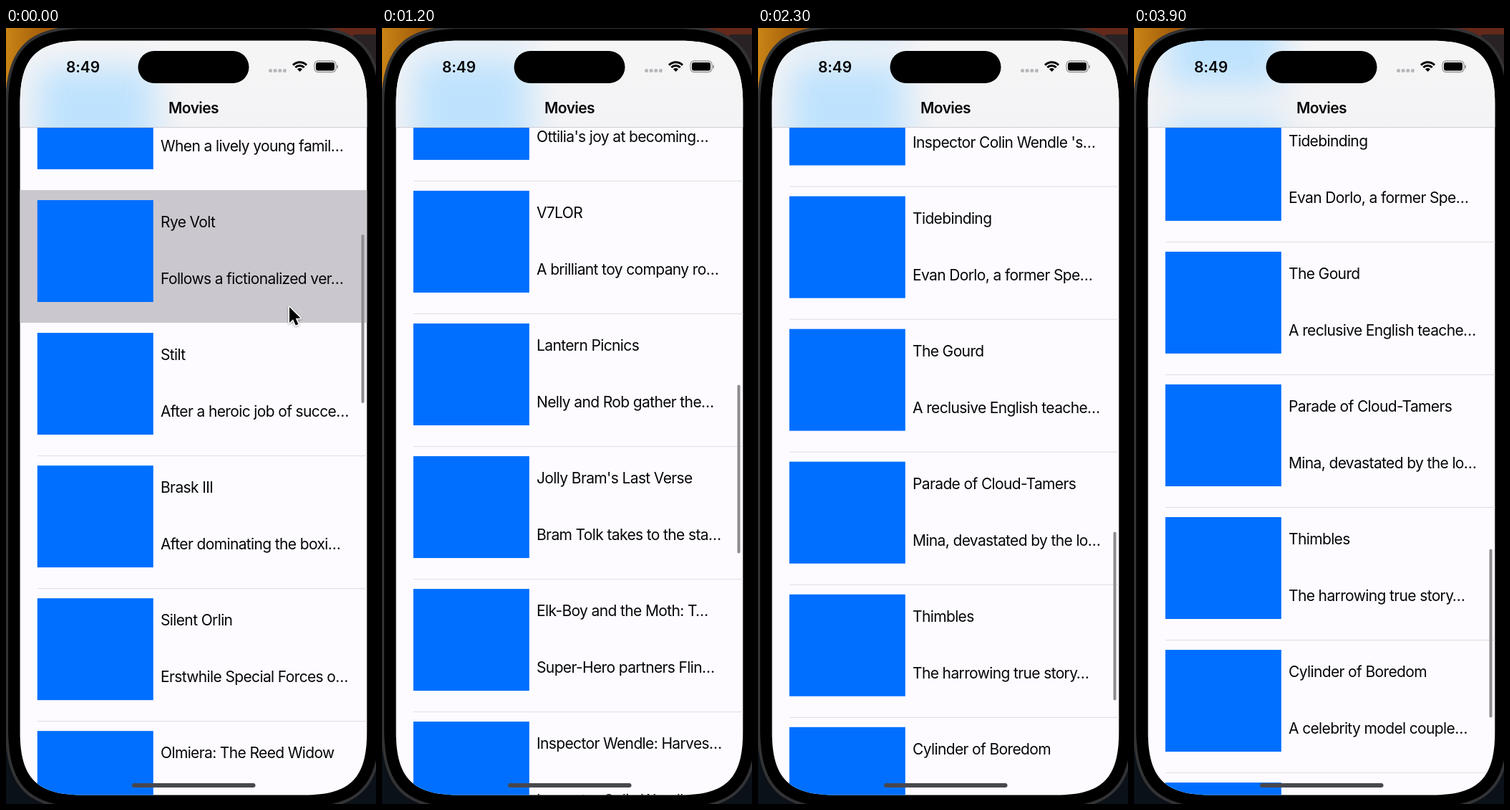
Write an HTML page with a canvas that moves like this. It is 517 by 1082 pixels and loops after 4000 ms.

```html
<!DOCTYPE html>
<html lang="en">
<head>
<meta charset="utf-8">
<title>Movies</title>
<style>
  html, body { margin: 0; width: 517px; height: 1082px; overflow: hidden; background: #000; }
  canvas { display: block; }
</style>
</head>
<body>
<canvas id="stage" width="517" height="1082"></canvas>
<script>
const ctx = document.getElementById('stage').getContext('2d');
const LOOP = 4000, STEP = 100;
const ROW = 185.05, FIRST_TOP = 240, THUMB_H = 142;
const HEADER_BOTTOM = 138;
const FONT = 'Inter, "Liberation Sans", sans-serif';

const movies = [
  ['', 'When a lively young famil…'],
  ['Rye Volt', 'Follows a fictionalized ver…'],
  ['Stilt', 'After a heroic job of succe…'],
  ['Brask III', 'After dominating the boxi…'],
  ['Silent Orlin', 'Erstwhile Special Forces o…'],
  ['Olmiera: The Reed Widow', "Ottilia's joy at becoming…"],
  ['V7LOR', 'A brilliant toy company ro…'],
  ['Lantern Picnics', 'Nelly and Rob gather the…'],
  ["Jolly Bram's Last Verse", 'Bram Tolk takes to the sta…'],
  ['Elk-Boy and the Moth: T…', 'Super-Hero partners Flin…'],
  ['Inspector Wendle: Harves…', "Inspector Colin Wendle 's…"],
  ['Tidebinding', 'Evan Dorlo, a former Spe…'],
  ['The Gourd', 'A reclusive English teache…'],
  ['Parade of Cloud-Tamers', 'Mina, devastated by the lo…'],
  ['Thimbles', 'The harrowing true story…'],
  ['Cylinder of Boredom', 'A celebrity model couple…'],
  ['', '']
];

const clamp01 = v => Math.min(1, Math.max(0, v));

// Two flicks, each gliding to rest with exponential friction; t in seconds.
function firstGlide(t) {
  return 519.4 * (1 - Math.exp(-2.03 * Math.max(0, t - 0.05)));
}
function secondGlide(t) {
  const friction = t < 1.9 ? 2.008 : 2.03;
  return 1968 - 252.5 * Math.exp(-friction * (t - 1.9));
}
function scrollAt(t) {
  const grab = 0.8, pull = 0.85, release = 1.05;
  if (t >= release) return secondGlide(t);
  const held = firstGlide(Math.min(t, grab));
  const u = clamp01((t - pull) / (release - pull));
  return held + (secondGlide(release) - held) * u ** 3.47;
}

function pointerAt(t) {
  if (t > 1.05) return null;
  const u = clamp01(t / 0.55), ease = u * u * (3 - 2 * u);
  const drag = t > 0.8 ? scrollAt(t) - scrollAt(0.8) : 0;
  return [396 - 90 * ease, 389 + 459 * ease - drag];
}

function fillRound(x, y, w, h, r, color) {
  ctx.beginPath();
  ctx.roundRect(x, y, w, h, r);
  ctx.fillStyle = color;
  ctx.fill();
}

function fillBox(x, y, w, h, color) {
  ctx.fillStyle = color;
  ctx.fillRect(x, y, w, h);
}

// Rectangle whose corners ease into the sides, like a phone's outline.
function smoothRect(x, y, w, h, r) {
  const a = r * 1.3, c = r * 0.348, right = x + w, bottom = y + h;
  ctx.beginPath();
  ctx.moveTo(x, y + a);
  ctx.bezierCurveTo(x, y + c, x + c, y, x + a, y);
  ctx.lineTo(right - a, y);
  ctx.bezierCurveTo(right - c, y, right, y + c, right, y + a);
  ctx.lineTo(right, bottom - a);
  ctx.bezierCurveTo(right, bottom - c, right - c, bottom, right - a, bottom);
  ctx.lineTo(x + a, bottom);
  ctx.bezierCurveTo(x + c, bottom, x, bottom - c, x, bottom - a);
  ctx.closePath();
}

function label(text, x, y, { weight = 400, align = 'left', spacing = -0.63 } = {}) {
  ctx.font = `${weight} 21px ${FONT}`;
  ctx.letterSpacing = spacing + 'px';
  ctx.textAlign = align;
  ctx.fillStyle = '#050507';
  ctx.fillText(text, x, y);
}

function gradient(x0, y0, x1, y1, ...stops) {
  const g = ctx.createLinearGradient(x0, y0, x1, y1);
  stops.forEach(([at, color]) => g.addColorStop(at, color));
  return g;
}

function drawDesktop() {
  fillBox(0, 0, 517, 500, gradient(0, 0, 517, 0,
    [0, '#c98416'], [0.09, '#a8620c'], [0.3, '#70300f'], [1, '#63281a']));
  fillBox(485, 9, 32, 80, '#292224');
  fillBox(0, 90, 517, 992, '#0b1118');
  smoothRect(-1, -3, 526, 1093, 88);
  ctx.fillStyle = '#333335';
  ctx.fill();
  smoothRect(3, 1, 518, 1085, 84);
  ctx.fillStyle = '#000';
  ctx.fill();
}

const rowTop = (i, scroll) => FIRST_TOP + ROW * (i - 1) - scroll;

function drawList(scroll, pressed) {
  movies.forEach(([title, plot], i) => {
    const top = rowTop(i, scroll);
    if (top > 1090 || top < -200) return;
    if (pressed && i === 1) {
      fillBox(19, top - 14, 486, ROW, '#cac7ce');
    } else if (!(pressed && i === 2)) {
      fillBox(44, top - 14, 461, 1, '#dfdde2');
    }
    fillBox(43.8, top, 162, THUMB_H, '#006fff');
    label(title, 216, top + 38);
    label(plot, 216, top + 117);
  });
}

function drawHeader(scroll) {
  ctx.save();
  ctx.beginPath();
  ctx.rect(19, 17, 486, HEADER_BOTTOM - 17);
  ctx.clip();
  fillBox(19, 17, 486, 121, gradient(0, 18, 0, 138, [0, '#f6f5f6'], [1, '#f3f3f5']));
  ctx.filter = 'blur(23px)';
  movies.forEach((_, i) => {
    const top = rowTop(i, scroll);
    if (top < 200 && top > -200) fillBox(44, top, 162, THUMB_H, '#bee2fd');
  });
  ctx.restore();
  fillBox(19, HEADER_BOTTOM, 486, 1, '#cfd0d4');
  label('Movies', 262, 118.5, { weight: 600, align: 'center' });
}

function drawWifi() {
  const cx = 410.5, cy = 61;
  ctx.strokeStyle = ctx.fillStyle = '#000';
  ctx.lineWidth = 3;
  for (const r of [8.6, 13.2]) {
    ctx.beginPath();
    ctx.arc(cx, cy, r, -Math.PI * 0.755, -Math.PI * 0.245);
    ctx.stroke();
  }
  ctx.beginPath();
  ctx.moveTo(cx, cy);
  ctx.arc(cx, cy, 5, -Math.PI * 0.75, -Math.PI * 0.25);
  ctx.fill();
}

function drawStatus() {
  fillRound(184.5, 32, 155, 45, 22.5, '#000');
  label('8:49', 107.5, 62, { weight: 600, align: 'center', spacing: -0.2 });
  for (let i = 0; i < 4; i++) fillRound(367 + i * 6.6, 57, 5, 5, 2, '#b8b8bc');
  drawWifi();
  ctx.beginPath();
  ctx.roundRect(431, 46, 30, 15.5, 5);
  ctx.lineWidth = 1.3;
  ctx.strokeStyle = '#98989c';
  ctx.stroke();
  fillRound(433, 48, 26, 11.5, 3, '#000');
  fillRound(462.2, 51.5, 1.8, 5, 1, '#98989c');
}

function drawPointer([x, y]) {
  ctx.save();
  ctx.translate(x, y);
  ctx.beginPath();
  [[0, 0], [0, 22], [5, 17.3], [8.8, 25.5], [12.4, 24], [8.8, 16], [15.5, 15.6]]
    .forEach(p => ctx.lineTo(...p));
  ctx.closePath();
  ctx.shadowColor = 'rgba(0,0,0,.35)';
  ctx.shadowBlur = 3;
  ctx.shadowOffsetY = 1;
  ctx.lineWidth = 3;
  ctx.lineJoin = 'round';
  ctx.strokeStyle = '#fff';
  ctx.stroke();
  ctx.shadowColor = 'transparent';
  ctx.fillStyle = '#000';
  ctx.fill();
  ctx.restore();
}

function draw(t) {
  const scroll = scrollAt(t), pointer = pointerAt(t);
  drawDesktop();
  ctx.save();
  smoothRect(19.6, 17.8, 484.7, 1051.6, 67.5);
  ctx.clip();
  fillBox(19, 17, 486, 1053, '#fdfbff');
  drawList(scroll, t < 0.05);
  drawHeader(scroll);
  drawStatus();
  fillRound(496.5, 288 + scroll * 0.2233, 4, 235, 2, '#8d8b8f');
  fillRound(176, 1053, 172.5, 6, 3, '#48484c');
  ctx.restore();
  if (pointer) drawPointer(pointer);
}

function tick(now) {
  const ms = now % LOOP;
  draw(Math.floor(ms / STEP) * STEP / 1000);
  requestAnimationFrame(tick);
}
requestAnimationFrame(tick);
</script>
</body>
</html>
```
